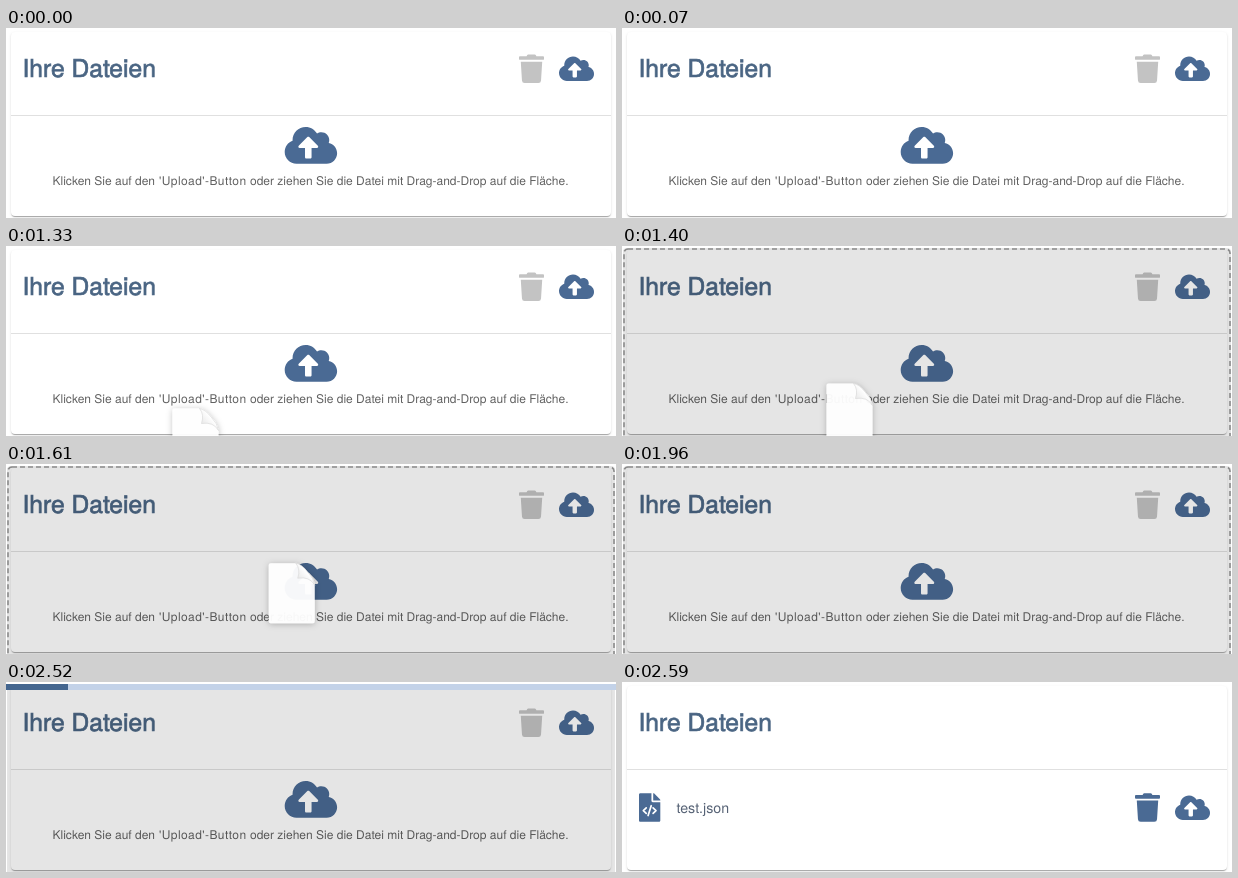
These frames come from a looping animation (610x190 px, 4830 ms). An HTML page:

```html
<!DOCTYPE html>
<html lang="de">
<head>
<meta charset="utf-8">
<title>Datei-Upload</title>
<style>
  html, body { margin: 0; width: 100%; height: 100%; overflow: hidden; background: #fff; }
  #stage { position: relative; width: 610px; height: 190px; overflow: hidden; }
  #card {
    position: absolute; left: 5px; top: 4px; width: 600px; height: 184px;
    border-radius: 4px; background: #fff;
    box-shadow: 0 2px 1px -1px rgba(0,0,0,.2), 0 1px 1px rgba(0,0,0,.14), 0 1px 3px rgba(0,0,0,.1);
  }
  svg { position: absolute; left: 0; top: 0; display: block; }
  text {
    font-family: "Helvetica Neue", "Liberation Sans", Arial, sans-serif;
    text-rendering: geometricPrecision;
  }
  .title { font-size: 24.6px; fill: #4a6583; stroke: #4a6583; stroke-width: .7px; }
  .hint { font-size: 12px; fill: #606060; }
  .name { font-size: 14.2px; fill: #566275; }
  .blue { fill: #4a6a94; }
  .pale { fill: #c3c3c3; }
</style>
</head>
<body>
<div id="stage">
  <div id="card"></div>
  <svg width="610" height="190" viewBox="0 0 610 190">
    <defs>
      <path id="cloud" fill-rule="evenodd" d="M537.6 226.6c4.1-10.7 6.4-22.4 6.4-34.6 0-53-43-96-96-96-19.700 0-38.100 6-53.300 16.200C367 64.200 315.300 32 256 32c-88.400 0-160 71.600-160 160 0 2.700.1 5.400.2 8.100C40.200 219.800 0 273.200 0 336c0 79.500 64.500 144 144 144h368c70.700 0 128-57.300 128-128 0-61.900-44-113.600-102.400-125.400zM393.400 288H328v112c0 8.800-7.200 16-16 16h-48c-8.800 0-16-7.200-16-16V288h-65.400c-14.300 0-21.400-17.200-11.300-27.300l105.400-105.400c6.200-6.200 16.400-6.200 22.600 0l105.400 105.400c10.100 10.100 2.900 27.300-11.300 27.300z"/>
      <path id="trash" d="M432 32H312l-9.400-18.700A24 24 0 0 0 281.100 0H166.800a23.700 23.700 0 0 0-21.400 13.300L136 32H16A16 16 0 0 0 0 48v32a16 16 0 0 0 16 16h416a16 16 0 0 0 16-16V48a16 16 0 0 0-16-16zM53.200 467a48 48 0 0 0 47.900 45h245.800a48 48 0 0 0 47.900-45L416 128H32z"/>
      <g id="codeFile">
        <path d="M384 122V128H256V0h6c6 0 12 2.500 17 7l98 98A24 24 0 0 1 384 122zM248 160c-13 0-24-11-24-24V0H24C11 0 0 11 0 24v464c0 13 11 24 24 24h336c13 0 24-11 24-24V160z"/>
        <path d="M130 262L78 312L130 362M254 262L306 312L254 362M220 224L164 400" fill="none" stroke="#fff" stroke-width="31" stroke-linecap="round" stroke-linejoin="round"/>
      </g>
      <filter id="soft" x="-40%" y="-40%" width="180%" height="180%">
        <feDropShadow dx="0" dy="1" stdDeviation="3" flood-color="#000" flood-opacity=".26"/>
      </filter>
      <linearGradient id="fold" x1="0" y1="1" x2="1" y2="0">
        <stop offset="0" stop-color="#dcdcdc"/>
        <stop offset=".6" stop-color="#fff"/>
      </linearGradient>
    </defs>

    <text class="title" x="16.500" y="49">Ihre Dateien</text>
    <path d="M5 87.500H605" stroke="#e0e0e0"/>

    <g id="empty">
      <use href="#trash" class="pale" transform="translate(513 26.500) scale(.0558)"/>
      <use href="#cloud" class="blue" transform="translate(553 26.700) scale(.0547)"/>
      <use href="#cloud" class="blue" transform="translate(278.700 96.400) scale(.0819)"/>
      <text class="hint" y="157"><tspan x="46.500">Klicken Sie auf den</tspan><tspan x="153" letter-spacing=".42">'Upload'-Button</tspan><tspan x="244">oder ziehen Sie die Datei mit Drag-and-Drop auf die Fläche.</tspan></text>
    </g>

    <g id="list">
      <use href="#codeFile" class="blue" transform="translate(17 111.300) scale(.0555)"/>
      <text class="name" x="54.500" y="131">test.json</text>
      <use href="#trash" class="blue" transform="translate(513 111.300) scale(.0558)"/>
      <use href="#cloud" class="blue" transform="translate(553 111.700) scale(.0547)"/>
    </g>

    <rect id="shade" x="1" y="2" width="608" height="196" rx="4" fill="#000" fill-opacity=".1"/>
    <rect id="dashes" x="2" y="3" width="606" height="196" rx="4" fill="none" stroke="#8a8a8a" stroke-width="1.600" stroke-dasharray="5 3"/>

    <g id="progress">
      <rect y="2" width="610" height="6" fill="#c3d2e8"/>
      <rect id="bar" y="2" height="6" fill="#44668f"/>
    </g>

    <g id="page" filter="url(#soft)">
      <path d="M0 2Q0 0 2 0H27Q33 1 39 9Q46 16 46 22V58Q46 60 44 60H2Q0 60 0 58Z" fill="#fff" fill-opacity=".95"/>
      <path d="M27 0Q32 6 29 15Q41 13 46 22Q45 15 39 9Q33 1 27 0Z" fill="url(#fold)" stroke="#d6d6d6" stroke-width=".6"/>
    </g>
  </svg>
</div>
<script>
  const LOOP = 4830, STEP = 70;
  const ENTER = 1330, HOVER = 1400, REST = 1750, DROP = 1890, GONE = 1960, UPLOAD = 2030, DONE = 2590;
  const el = id => document.getElementById(id);
  const show = (id, on) => { el(id).style.display = on ? '' : 'none'; };

  function draw(time) {
    const t = Math.floor((time % LOOP) / STEP) * STEP;
    const done = t >= DONE;
    const uploading = t >= UPLOAD && !done;

    show('empty', !done);
    show('list', done);
    show('shade', t >= HOVER && !done);
    show('dashes', t >= HOVER && t < UPLOAD);
    show('progress', uploading);
    show('page', t >= ENTER && t < GONE);

    // The dragged page slows down as it nears the drop point.
    const n = (Math.min(Math.max(t, ENTER), REST) - ENTER) / STEP;
    const glide = (1 - 0.7 ** n) / 0.3;
    el('page').setAttribute('transform', `translate(${166.5 + 38 * glide} ${162.5 - 25 * glide})`);
    el('page').setAttribute('opacity', t >= DROP ? 0.5 : 1);

    if (uploading) el('bar').setAttribute('width', 62 * (t - UPLOAD) / (DONE - STEP - UPLOAD));
  }

  const start = performance.now();
  function tick() {
    draw(performance.now() - start);
    requestAnimationFrame(tick);
  }
  tick();
</script>
</body>
</html>
```
